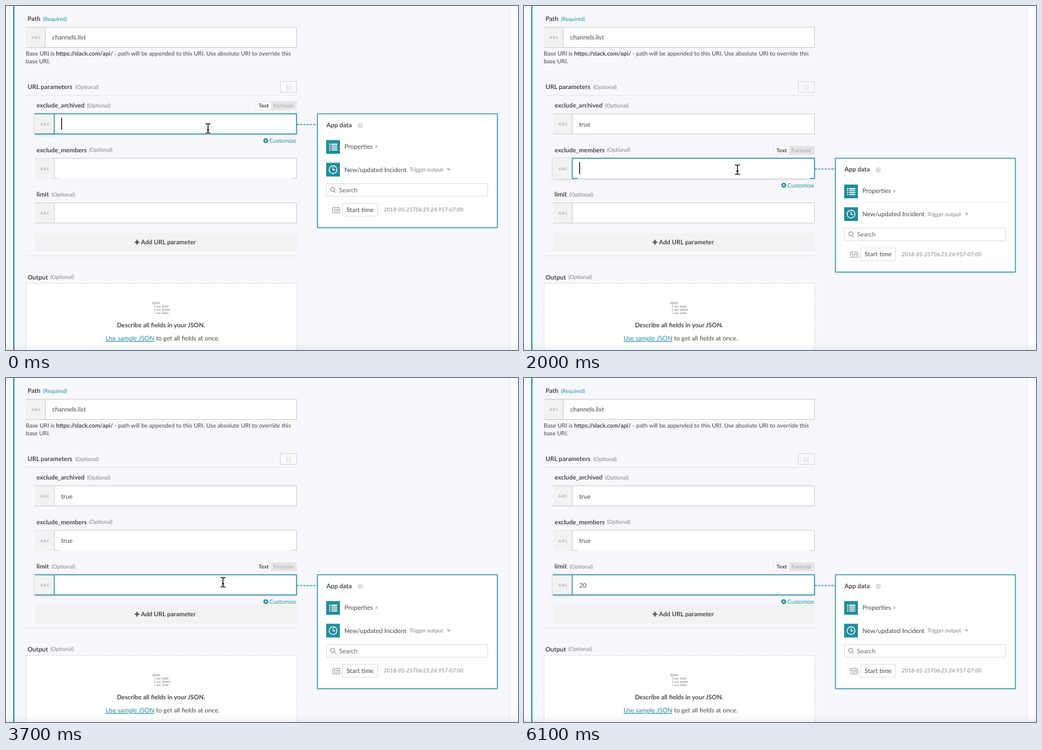
An HTML page for the animation above (6200 ms loop, 854 by 576 pixels).

```html
<!DOCTYPE html>
<html lang="en">
<head>
<meta charset="utf-8">
<title>URL parameters form</title>
<style>
  html, body { margin: 0; width: 100%; height: 100%; overflow: hidden; background: #f7f8fc; }
  svg { display: block; width: 854px; height: 576px; font: 10.5px Lato, sans-serif; fill: #484848; text-rendering: geometricPrecision; }
  .b { font-weight: 700; }
  .label { font-weight: 700; font-size: 10.45px; }
  .small { font-size: 9.05px; }
  .help { font-size: 9.75px; }
  .gray { fill: #808080; }
  .teal { fill: #238d9b; }
  .abc { font-size: 6.2px; font-weight: 700; letter-spacing: 1.2px; fill: #aaa; }
  .cell { fill: #f2f2f2; }
  .white { fill: #fff; }
  .line { fill: none; stroke: #e4e5e9; }
  .border { fill: none; stroke: #c9c9c9; }
  .focused .border { stroke: #238d9b; stroke-width: 1.4; }
  .focused .back { filter: drop-shadow(0 1px 2px #0003); }
  .tealLine { fill: none; stroke: #238d9b; stroke-width: 1.3; }
  .icon { fill: none; stroke: #fff; stroke-width: 1.3; }
</style>
</head>
<body>
<svg viewBox="0 0 854 576">
  <defs>
    <linearGradient id="shade" x2="0" y2="1">
      <stop stop-opacity="0"/><stop offset="1" stop-opacity=".05"/>
    </linearGradient>
  </defs>
  <rect width="854" height="576" fill="#f7f8fc"/>
  <rect width="12" height="576" fill="#fafbfd"/>
  <rect x="12" width="2" height="576" class="teal"/>
  <rect x="840" width="14" height="576" fill="#fbfcfe"/>
  <path d="M839.5 0V576" class="line"/>

  <text x="36" y="25.2" class="label">Path</text>
  <text x="61.7" y="25" class="small teal">(Required)</text>
  <rect x="33" y="35" width="33" height="35" class="cell"/>
  <rect x="66" y="36" width="418" height="33" class="white"/>
  <path d="M33 35.5H484.5V69.5H33M65.5 35V70" class="border"/>
  <text x="42.5" y="55" class="abc">ABC</text>
  <text x="77" y="56">channels.list</text>
  <text x="33" y="83" class="help">Base URI is <tspan class="b">https://slack.com/api/</tspan> - path will be appended to this URI. Use absolute URI to override this</text>
  <text x="33" y="96" class="help">base URI.</text>

  <text x="36" y="139" class="label">URL parameters</text>
  <text x="115.5" y="138.8" class="small gray">(Optional)</text>
  <rect x="457.5" y="126.5" width="27" height="18" fill="#f9f9fb" stroke="#d3d4d8"/>
  <text x="471" y="138.5" text-anchor="middle" class="small" fill="#c0c0c0">{;}</text>
  <path d="M33 149.5H485M33 418.5H485" class="line"/>

  <rect x="48" y="380" width="437.5" height="31.5" class="cell"/>
  <path d="M214.5 395.5h8M218.5 391.5v8" stroke="#484848" stroke-width="2.2"/>
  <text x="225" y="399.3" class="label">Add URL parameter</text>

  <g id="fields"></g>

  <text x="36" y="457.5" class="label">Output</text>
  <text x="74" y="457.3" class="small gray">(Optional)</text>
  <rect x="33.5" y="464.5" width="451.5" height="140" fill="#fff" stroke="#d4d4d4" stroke-dasharray="3 2"/>
  <g fill="#cecece">
    <path d="M244 495.500h13v4h-13zM251 502h7v3h-7zM251 507.500h7v3h-7zM251 513h7v3h-7z"/>
    <path d="M260 501.500h11v3.500h-11zM260 507h14v3.500h-14zM260 512.500h11v3.500h-11z"/>
    <path d="M247.500 499V514.500H251M247.500 503.500H251M247.500 509H251" fill="none" stroke="#cecece"/>
  </g>
  <text x="185" y="538" class="label">Describe all fields in your JSON.</text>
  <text x="166" y="560"><tspan class="teal" text-decoration="underline">Use sample JSON</tspan> to get all fields at once.</text>

  <g id="panel">
    <path d="M485 198.500H519" class="tealLine" stroke-dasharray="3.500 2"/>
    <rect x="519.500" y="180.500" width="300" height="190.500" class="tealLine" style="fill:#fff;filter:drop-shadow(0 1px 2px #0002)"/>
    <text x="534.500" y="202.800" class="b">App data</text>
    <circle cx="591" cy="200" r="4.500" fill="#dcdcdc"/>
    <text x="591" y="202.600" text-anchor="middle" class="b white" font-size="7">?</text>
    <path id="rule" d="M564 254.500H804" class="line"/>

    <rect x="534" y="224.500" width="23" height="23" class="teal"/>
    <path d="M539 231.500h2m1.500 0h10M539 234.700h2m1.500 0h10M539 237.900h2m1.500 0h10M539 241.100h2m1.500 0h10" class="icon" style="stroke-width:1.800"/>
    <text x="564.500" y="238.800">Properties</text>
    <path d="M616.500 232.500l4 3l-4 3z" fill="#c0c0c0"/>

    <rect x="534" y="262.500" width="23" height="23" class="teal"/>
    <circle cx="545.500" cy="274" r="6.500" class="icon"/>
    <path d="M545.500 270V274.500H549" class="icon"/>
    <text x="564.500" y="277.700">New/updated Incident</text>
    <text x="673" y="277.300" class="small gray">Trigger output</text>
    <path d="M734.500 272h7.500l-3.750 4z" fill="#b8b8b8"/>

    <rect x="534.500" y="297.500" width="269" height="21" fill="#fff" stroke="#dedede"/>
    <path d="M547.700 310l2.800 3M548.500 307a3.500 3.500 0 1 0-7 0a3.500 3.500 0 1 0 7 0" fill="none" stroke="#777"/>
    <text x="555.500" y="311.600" fill="#666">Search</text>

    <g fill="none" stroke="#a0a0a0" stroke-width=".9">
      <path d="M552 346.500H544.500V337.500H556.500V341M544.500 340.500H556.500M547.500 336v2.500M553.500 336v2.500M547 342.500h3M547 344.500h3"/>
      <circle cx="554.500" cy="344" r="3.200" fill="#fff"/>
      <path d="M554.500 342V344.300H556"/>
    </g>
    <rect x="561.500" y="330.500" width="58" height="21.500" fill="#fff" stroke="#dedede"/>
    <text x="568" y="344.700">Start time</text>
    <text x="630" y="344.300" class="small gray" font-style="italic">2018-05-25T06:25:24.957-07:00</text>
  </g>

  <rect id="caret" width="1.400" height="20" fill="#111"/>
  <path id="arrow" d="M0 0V13.500L3.100 10.700L5.200 15.600L7.400 14.600L5.300 9.900H9.600Z" fill="#111" stroke="#fff" stroke-width=".8"/>
  <g id="beam" fill="none">
    <path d="M-4-8Q0-8 0-6Q0-8 4-8M0-6V6M-4 8Q0 8 0 6Q0 8 4 8M-2 2.500H2" stroke="#fff" stroke-width="3"/>
    <path d="M-4-8Q0-8 0-6Q0-8 4-8M0-6V6M-4 8Q0 8 0 6Q0 8 4 8M-2 2.500H2" stroke="#111" stroke-width="1.400"/>
  </g>
  <rect y="564" width="854" height="12" fill="url(#shade)"/>
</svg>

<script>
const LOOP = 6200, STEP = 100, ROW = 74.5;
const $ = id => document.getElementById(id);
const show = (el, on) => el.style.display = on ? '' : 'none';
const move = (el, x, y) => el.setAttribute('transform', `translate(${x} ${y})`);

const fields = [
  { name: 'exclude_archived', hintX: 135.3, value: 'true', keys: [500, 650, 800, 950], focus: 0, hover: [] },
  { name: 'exclude_members', hintX: 138.5, value: 'true', keys: [2300, 2450, 2600, 2700], focus: 2000, hover: [[1600, 2000], [5250, 5600]] },
  { name: 'limit', hintX: 76, value: '20', keys: [4000, 4150], focus: 3700, hover: [[3400, 3700]] }
];

// Pointer strokes as [time, x, y]; the pointer hides while typing.
const strokes = [
  [[0, 337, 205], [500, 337, 205]],
  [[1300, 341, 217], [1500, 349, 251], [1700, 356, 274], [2300, 356, 274]],
  [[2900, 356, 274], [3200, 357, 282], [3500, 362, 340], [4000, 362, 345]],
  [[5100, 362, 345], [5400, 471, 76], [5700, 486, -20]]
];

const fieldMarkup = (f, i) => `
  <g transform="translate(0 ${i * ROW})">
    <text x="51" y="170" class="label">${f.name}</text>
    <text x="${f.hintX}" y="169.8" class="small gray">(Optional)</text>
    <g class="back">
      <rect x="48" y="180" width="33" height="35" class="cell"/>
      <rect x="81" y="181" width="403.500" height="33" class="white"/>
    </g>
    <path d="M48 180.500H80" class="line"/>
    <path d="${i === 1 ? 'M89 214.300H80.500V180.500H484.500V214.300H477' : 'M48 214.300H484.500V180.500H48M80.500 180.500V214.300'}" class="border"/>
    <text x="57.500" y="200" class="abc">ABC</text>
    <text x="92" y="201.800" class="value"></text>
    <g class="tools">
      <rect x="416.500" y="159.500" width="68.500" height="15" fill="#e5e5e5"/>
      <rect x="417.500" y="160.500" width="24.500" height="13" class="white"/>
      <text x="421.300" y="170" class="small b">Text</text>
      <text x="446" y="170" class="small b" fill="#b4b4b4">Formula</text>
      <circle cx="433.300" cy="225.500" r="2.400" fill="none" stroke="#238d9b" stroke-width="2"/>
      <circle cx="433.300" cy="225.500" r="3.700" fill="none" stroke="#238d9b" stroke-width="1.400" stroke-dasharray="1.700 1.206"/>
      <text x="439.300" y="229" class="help teal">Customize</text>
    </g>
  </g>`;

$('fields').innerHTML = fields.map(fieldMarkup).join('');
fields.forEach((f, i) => {
  f.el = $('fields').children[i];
  f.text = f.el.querySelector('.value');
  f.tools = f.el.querySelector('.tools');
});

function pointerAt(t) {
  const stroke = strokes.find(s => t >= s[0][0] && t < s.at(-1)[0]);
  if (!stroke) return null;
  const i = stroke.findIndex(p => p[0] > t);
  const [t0, x0, y0] = stroke[i - 1], [t1, x1, y1] = stroke[i];
  const k = (t - t0) / (t1 - t0);
  return [x0 + (x1 - x0) * k, y0 + (y1 - y0) * k];
}

const overInput = ([x, y]) => x < 485 &&
  (x > 66 && y > 35 && y < 70 || x > 81 && fields.some((f, i) => y > 180 + i * ROW && y < 214 + i * ROW));

function draw(t) {
  const active = fields.findLastIndex(f => t >= f.focus);
  fields.forEach((f, i) => {
    f.text.textContent = f.value.slice(0, f.keys.filter(k => t >= k).length);
    f.el.classList.toggle('focused', i === active);
    show(f.tools, i === active || f.hover.some(([a, b]) => t >= a && t < b));
  });

  move($('panel'), 0, active * ROW);
  show($('rule'), active === 1);

  const blinkStart = active === 2 ? 4150 : 0;
  show($('caret'), t >= blinkStart && (t - blinkStart) % 1000 < 500);
  move($('caret'), 92 + fields[active].text.getComputedTextLength(), 187 + active * ROW);

  const pointer = pointerAt(t);
  const beam = pointer && overInput(pointer);
  show($('beam'), beam);
  show($('arrow'), pointer && !beam);
  if (pointer) move($(beam ? 'beam' : 'arrow'), ...pointer);
}

function tick() {
  const t = performance.now() % LOOP;
  draw(Math.floor(t / STEP) * STEP);
  requestAnimationFrame(tick);
}
tick();
</script>
</body>
</html>
```
